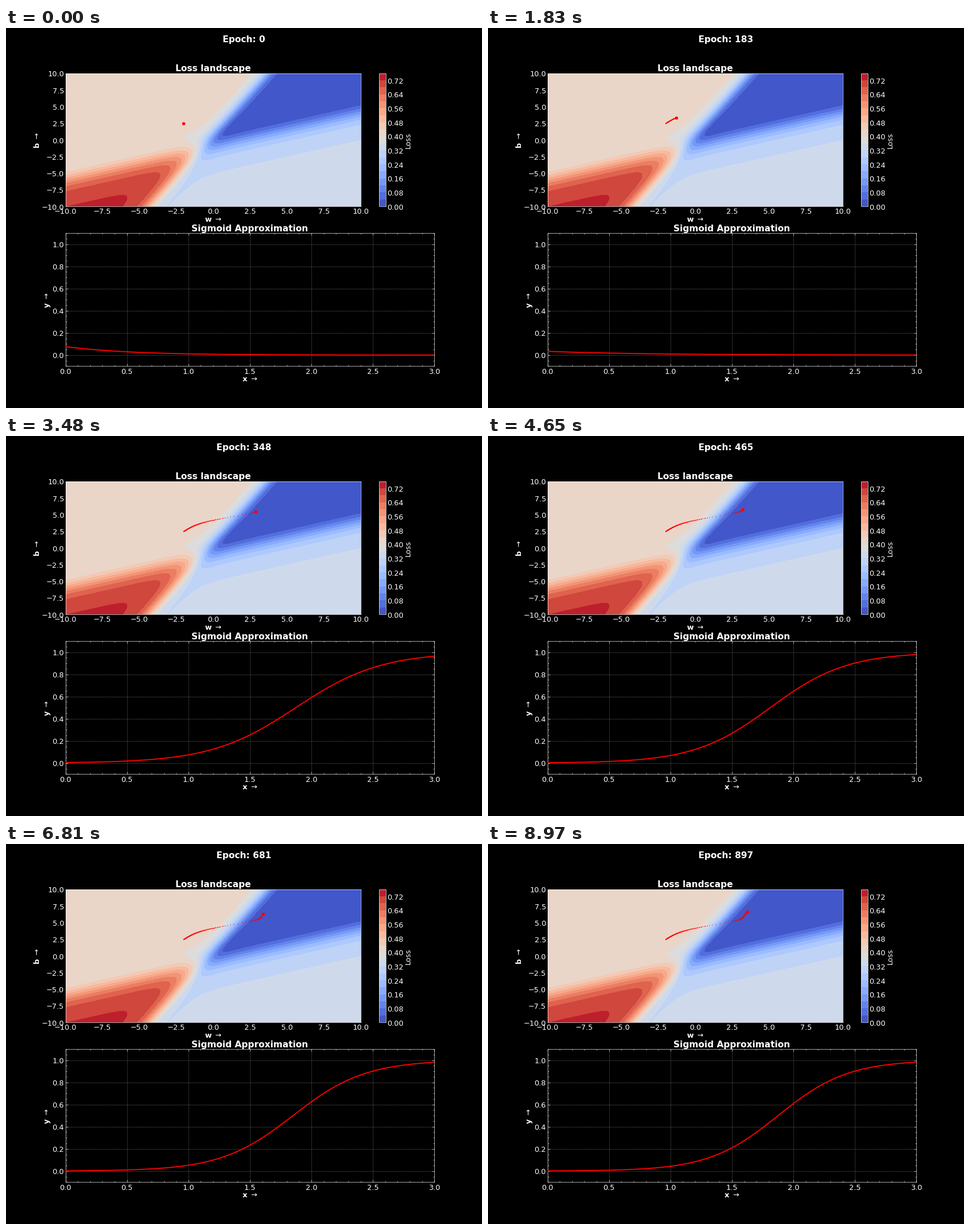
These frames come from a looping animation (837x669 px, 9 s). A matplotlib script:

```python
import numpy as np
import matplotlib.pyplot as plt
from matplotlib.animation import FuncAnimation
from matplotlib.ticker import AutoMinorLocator

plt.style.use("dark_background")
plt.rcParams.update({
    "font.family": "DejaVu Sans",
    "font.size": 10,
    "axes.titleweight": "bold",
    "axes.labelweight": "bold",
    "axes.titlepad": 3,
    "axes.labelpad": 0.5,
    "axes.linewidth": 0.5,
    "axes.axisbelow": True,
})
for axis in ("xtick", "ytick"):
    plt.rcParams.update({
        f"{axis}.direction": "in",
        f"{axis}.major.pad": 2,
        f"{axis}.major.size": 3,
        f"{axis}.major.width": 0.5,
        f"{axis}.minor.size": 1.5,
        f"{axis}.minor.width": 0.5,
    })

FRAMES, STEP = 300, 3
X = np.array([0.5, 2.5])
Y = np.array([0.2, 0.9])


def sigmoid(x, w, b):
    return 1 / (1 + np.exp(-(w * x - b)))


def train(w, b, epochs, rate=1.0):
    """Descent path; the bias step follows the +b convention."""
    path = [(w, b)]
    for _ in range(epochs):
        f = sigmoid(X, w, b)
        g = (f - Y) * f * (1 - f)
        w -= rate * np.sum(g * X)
        b -= rate * np.sum(g)
        path.append((w, b))
    return np.array(path)


def label(ax, x, y):
    ax.set_xlabel(rf"{x} $\rightarrow$")
    ax.set_ylabel(rf"{y} $\rightarrow$")


def draw_landscape(fig, ax):
    grid = np.linspace(-10, 10, 201)
    W, B = np.meshgrid(grid, grid)
    loss = sum((sigmoid(x, W, B) - y) ** 2 for x, y in zip(X, Y)) / 2
    fill = ax.contourf(W, B, loss, levels=np.arange(20) * 0.04,
                       cmap="coolwarm")
    ax.set_title("Loss landscape")
    label(ax, "w", "b")
    ax.tick_params(length=0)
    bar = fig.colorbar(fill, ax=ax, ticks=np.arange(10) * 0.08)
    bar.set_label("Loss", weight="normal", labelpad=1)
    bar.ax.tick_params(length=0)
    return bar.ax


def draw_plot(ax):
    ax.set(xlim=(0, 3), ylim=(-0.1, 1.1), title="Sigmoid Approximation")
    label(ax, "x", "y")
    ax.xaxis.set_minor_locator(AutoMinorLocator())
    ax.yaxis.set_minor_locator(AutoMinorLocator())
    ax.tick_params(which="both", top=True, right=True)
    ax.grid(color="white", alpha=0.5, linestyle=":", linewidth=0.7)


def overlay(fig, base):
    ax = fig.add_axes(base.get_position())
    ax.set(xlim=base.get_xlim(), ylim=base.get_ylim())
    ax.set_axis_off()
    return ax


# 837 x 669 pixels
fig, (top, low) = plt.subplots(2, 1, figsize=(9, 7.2), dpi=93)
bar_ax = draw_landscape(fig, top)
draw_plot(low)

# Render the still parts once; only the moving parts are redrawn
fig.canvas.draw()
still = np.array(fig.canvas.buffer_rgba())
map_ax, fit_ax = overlay(fig, top), overlay(fig, low)
for ax in (top, low, bar_ax):
    ax.set_visible(False)
fig.figimage(still, origin="upper", zorder=-1)

path = train(-2.0, 2.5, FRAMES * STEP)
xs = np.linspace(0, 3, 200)
title = fig.suptitle("", weight="bold")
trail = map_ax.scatter([], [], s=1, c="red", linewidths=0)
dot = map_ax.scatter([], [], s=18.5, c="red", linewidths=0, zorder=3)
curve, = fit_ax.plot([], [], color="red", linewidth=1.5)


def update(i):
    epoch = i * STEP
    title.set_text(f"Epoch: {epoch}")
    trail.set_offsets(path[:epoch + 1])
    dot.set_offsets(path[epoch:epoch + 1])
    curve.set_data(xs, sigmoid(xs, *path[epoch]))
    return title, trail, dot, curve


anim = FuncAnimation(fig, update, frames=FRAMES, interval=30,
                     repeat=True, repeat_delay=0, blit=False)
plt.show()
```
